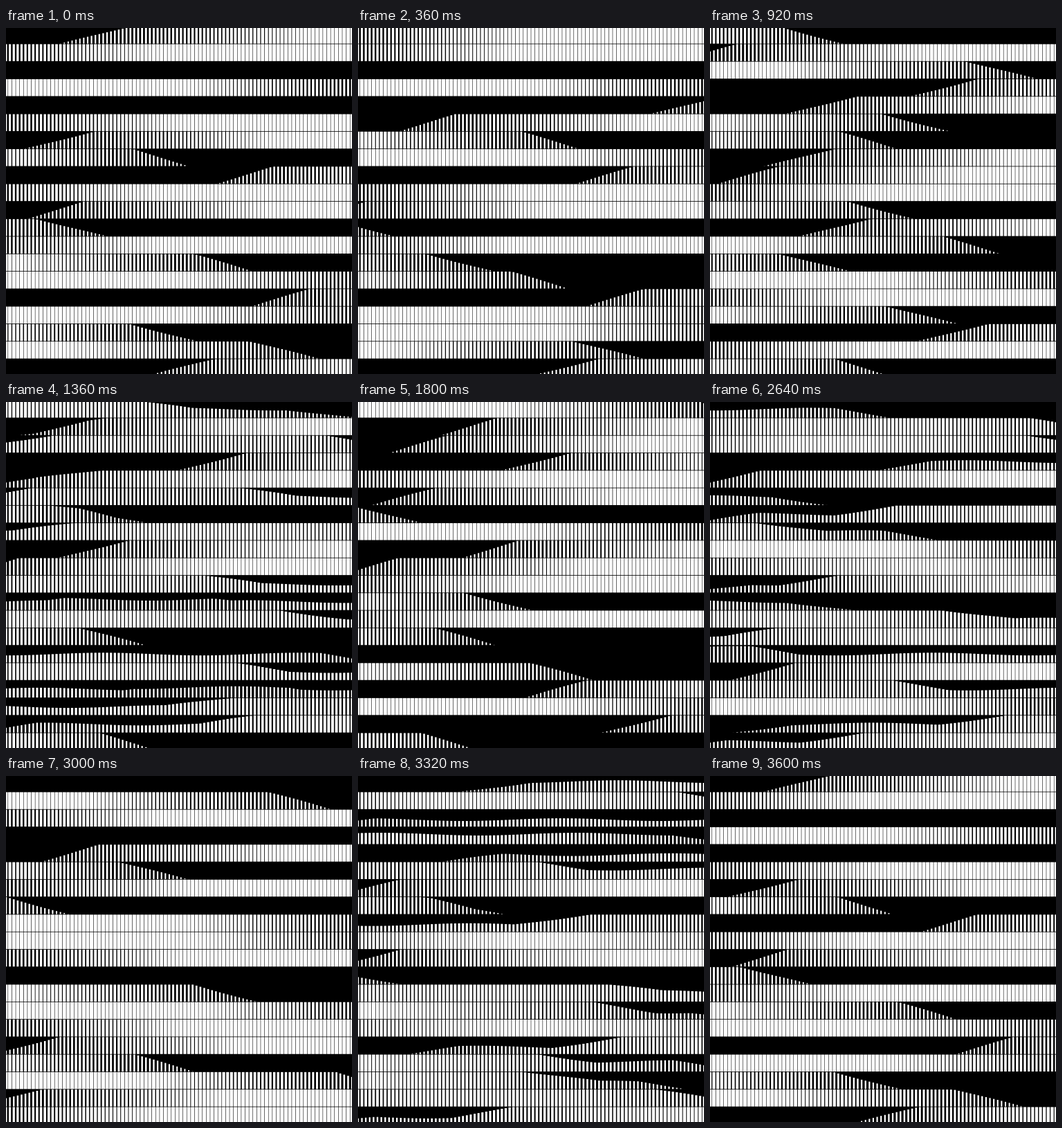
An HTML page with a canvas for the animation above (3.64 s loop, 500 by 500 pixels).

```html
<!DOCTYPE html>
<html>
<head>
<meta charset="utf-8">
<style>
html, body { margin: 0; height: 100%; overflow: hidden; background: #000; }
canvas { display: block; }
</style>
</head>
<body>
<canvas id="stage" width="500" height="500"></canvas>
<script>
const ctx = document.getElementById('stage').getContext('2d');
const SIZE = 500, ROWS = 20, PITCH = SIZE / 89, BAND = 25.28, TOP = -2.7;
const STEP = 40, STEPS = 91, PERIOD = 3600;

// One shadow edge per band, in percent of the stage plus 20, so it may lie outside.
// Positive: dark to the right of the edge; negative: dark to the left.
const poses = [
  { at: 0, edges: [-46, -1, -150, 135, -150, -8, -35, 65, -89, -1, -34, 39, -1, 82, 135, -100, 135, 66, 100, -71] },
  { at: 360, edges: [-5, -1, -150, 135, -115, -40, 75, 140, -92, -5, -12, 22, -1, 50, 72, -95, 140, 140, 92, -79] },
  { at: 920, edges: [50, -20, 104, -87, -52, 80, 65, -46, -32, -5, 70, -56, 95, 50, 135, -1, 81, -90, -5, 64] },
  { at: 1800, edges: [125, -52, -38, -71, -5, -34, 28, 130, -58, -24, -5, 61, -1, 50, -150, 78, -78, 140, -100, 46] },
  { at: 2280, edges: [80, -18, 108, -60, -10, -115, -80, 94, 140, -27, -64, 66, -1, -48, 22, -44, -8, 140, -110, -70] },
  { at: 3000, edges: [-150, 104, -1, -150, -38, 62, -10, 30, 135, 140, -8, -150, 84, 140, -8, -25, 65, 125, -20, -1] },
];
poses.push({ at: PERIOD, edges: poses[0].edges });

const mix = (a, b, k) => a + (b - a) * k;
const clamp = (v, lo, hi) => Math.min(hi, Math.max(lo, v));

let seed = 7;
const random = () => (seed = seed * 16807 % 2147483647) / 2147483647;
const phases = Array.from({ length: ROWS }, () => random() * 2 * Math.PI);

// Distance from the edge into the light
function lightDepth(edge, x) {
  return Math.sign(edge) * ((Math.abs(edge) - 20) / 100 * SIZE - x);
}
const heightAt = depth => 0.5 + clamp(depth, -120, 120) / 90;
const widthAt = depth => clamp(0.4 + depth * 0.0016, 0.25, 0.9);

function draw(now) {
  const t = Math.floor(now / STEP) % STEPS * STEP % PERIOD;
  const next = poses.findIndex(pose => pose.at > t);
  const from = poses[next - 1], to = poses[next];
  const k = (t - from.at) / (to.at - from.at);
  ctx.fillStyle = '#000';
  ctx.fillRect(0, 0, SIZE, SIZE);
  ctx.fillStyle = '#fff';
  for (let row = 0; row < ROWS; row++) {
    const bottom = TOP + (row + 1) * BAND;
    for (let x = 0; x <= SIZE + 1; x += PITCH) {
      const a = lightDepth(from.edges[row], x), b = lightDepth(to.edges[row], x);
      const ripple = 0.08 * Math.sin(x / 45 + phases[row] + 2 * Math.PI * t / PERIOD);
      const h = clamp(mix(heightAt(a), heightAt(b), k) + ripple, 0, 1) * (BAND - 0.8);
      const w = mix(widthAt(a), widthAt(b), k) * PITCH;
      ctx.fillRect(x - w / 2, bottom - h, w, h);
    }
  }
}

const start = performance.now();
function tick() {
  draw(performance.now() - start);
  requestAnimationFrame(tick);
}
tick();
</script>
</body>
</html>
```
